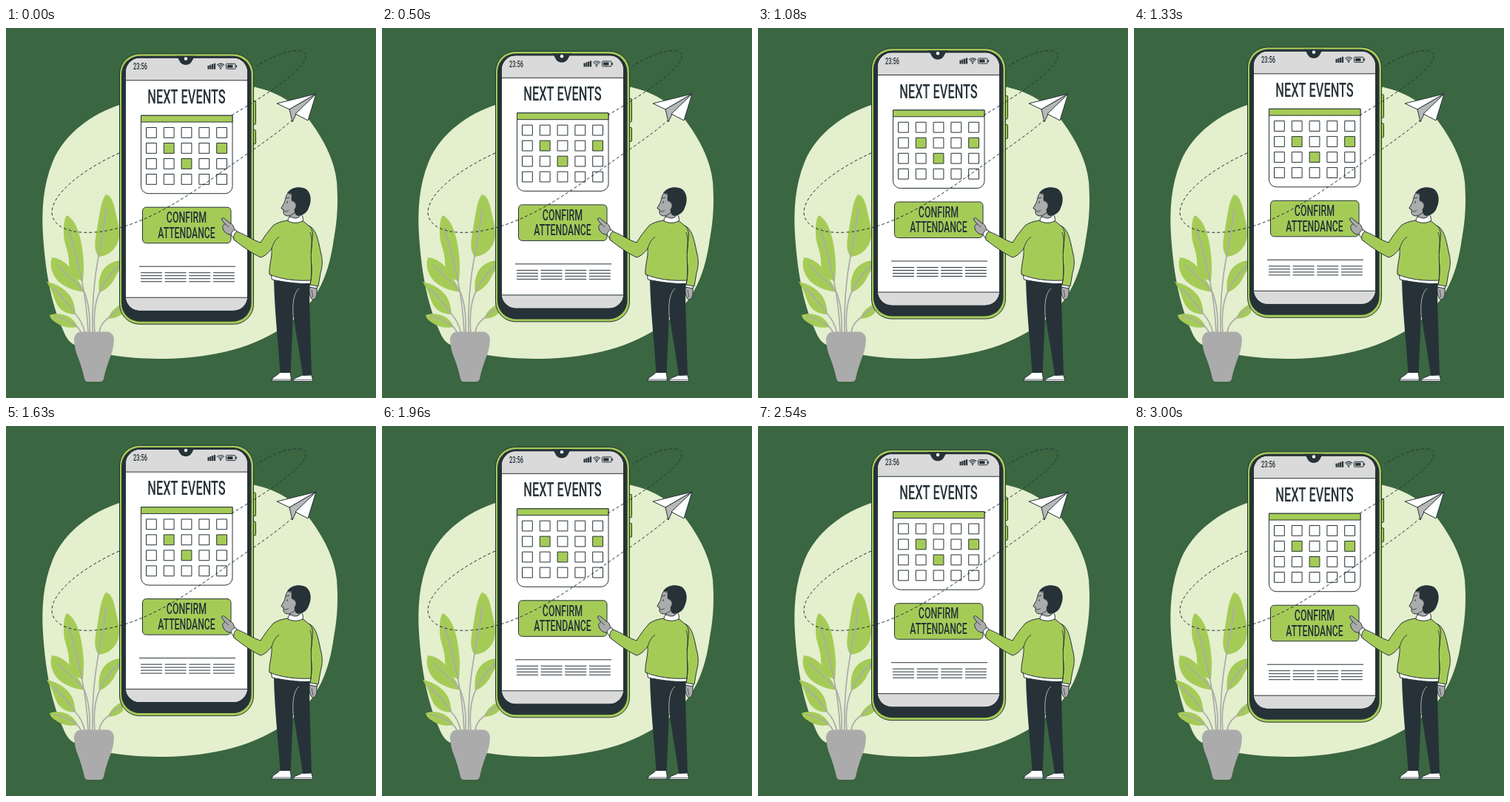
Recreate the animation shown at these times as an HTML page with a canvas. Size 500 by 500 pixels, loop 3.04 s.

```html
<!DOCTYPE html>
<html lang="en">
<head>
<meta charset="utf-8">
<title>Next events</title>
<style>
  html, body { margin: 0; width: 100%; height: 100%; overflow: hidden; background: #3a6641; }
  canvas { display: block; width: 500px; height: 500px; }
</style>
</head>
<body>
<canvas id="stage"></canvas>
<script>
const SIZE = 500;
const LOOP = 3040, FLOAT = 3000, FPS = 24, RISE = 10;
const DARK = '#263238', GREEN = '#a5cb57', GREY = '#ababab', BAR = '#dadada', WHITE = '#fff';
const NARROW = 0.62; // condensed lettering, shared by all text

const canvas = document.getElementById('stage');
const ctx = canvas.getContext('2d');
const dpr = window.devicePixelRatio || 1;
canvas.width = canvas.height = SIZE * dpr;

function shape(d, fill, stroke, width = 1) {
  const p = new Path2D(d);
  if (fill) { ctx.fillStyle = fill; ctx.fill(p); }
  if (stroke) { ctx.strokeStyle = stroke; ctx.lineWidth = width; ctx.stroke(p); }
}

function box(x, y, w, h, r, fill, stroke, width = 1) {
  ctx.beginPath();
  ctx.roundRect(x, y, w, h, r);
  if (fill) { ctx.fillStyle = fill; ctx.fill(); }
  if (stroke) { ctx.strokeStyle = stroke; ctx.lineWidth = width; ctx.stroke(); }
}

function dot(x, y, r, fill) {
  ctx.beginPath();
  ctx.arc(x, y, r, 0, Math.PI * 2);
  ctx.fillStyle = fill;
  ctx.fill();
}

function label(text, x, y, size) {
  ctx.save();
  ctx.translate(x, y);
  ctx.scale(NARROW, 1);
  ctx.font = `500 ${size}px Roboto, "Liberation Sans", sans-serif`;
  ctx.textAlign = 'center';
  ctx.fillStyle = DARK;
  ctx.fillText(text, 0, 0);
  ctx.restore();
}

function dashed(d) {
  ctx.save();
  ctx.setLineDash([4, 3]);
  shape(d, null, DARK);
  ctx.restore();
}

function backdrop() {
  ctx.fillStyle = '#3a6641';
  ctx.fillRect(0, 0, SIZE, SIZE);
  shape('M153 104C117 116 79 142 63 181C50 213 48 246 50 280C53 325 60 370 77 408C82 421 88 428 97 429' +
    'C130 443 170 447 214 447C280 446 338 432 382 399C424 369 437 328 443 285C448 258 449 236 447 208' +
    'C444 178 428 148 408 122C392 103 368 87 337 80C270 68 205 82 153 104Z', '#e4efce');
}

function plant() {
  const leaves = [
    'M135 225C143 226 146 238 149 253C154 272 155 287 147 297C141 305 134 308 126 309C119 304 119 290 123 272C126 256 128 233 135 225Z',
    'M82 253C92 258 98 272 101 287C105 306 106 324 104 342C93 340 85 329 85 316C85 300 77 291 78 274C78 265 79 257 82 253Z',
    'M62 310C74 311 84 319 90 329C96 340 102 346 106 357C94 355 83 352 74 345C63 337 58 322 62 310Z',
    'M55 343C66 345 78 351 85 360C92 368 93 378 94 387C83 387 73 382 68 372C64 362 61 352 55 343Z',
    'M59 388C67 385 79 386 86 391C92 395 95 399 97 404C87 406 76 404 69 399C64 396 60 393 59 388Z',
    'M158 314C145 314 134 320 129 331C125 340 125 349 126 358C136 353 143 346 147 338C150 331 154 326 158 322Z',
    'M158 372C148 377 140 384 138 393C147 393 154 389 158 385Z'
  ];
  for (const d of leaves) shape(d, GREEN);
  const stems = [
    'M117 413C116 375 119 340 125 308C129 285 134 265 135 245',
    'M111 413C110 385 107 362 102 339C97 315 90 290 85 270',
    'M113 413C114 390 112 372 106 357C97 344 81 333 70 321',
    'M107 413C104 400 100 393 94 387C85 374 75 362 64 352',
    'M102 413C100 407 96 403 91 400C83 395 74 391 66 390',
    'M120 413C118 389 120 370 127 356C133 341 143 329 156 319',
    'M126 413C126 404 130 398 138 392C145 385 151 381 156 378'
  ];
  ctx.lineCap = 'round';
  for (const d of stems) shape(d, null, GREY, 1.7);
  shape('M100 410.500H138Q145 412 146 420Q146 428 143 439Q135 459 132 474Q131 478 127 478H111' +
    'Q107 478 106 474Q103 459 95 439Q92 428 92 420Q93 412 100 410.500Z', GREY);
  ctx.lineCap = 'butt';
}

function statusBar() {
  label('23:56', 181.5, 56.2, 12);
  for (let i = 0; i < 4; i++) {
    const h = 5 + i;
    box(272.5 + i * 2.8, 56 - h, 2.2, h, 0, DARK);
  }
  ctx.strokeStyle = DARK;
  ctx.lineWidth = 1.1;
  for (const r of [2.4, 4.6, 6.8]) {
    ctx.beginPath();
    ctx.arc(290, 55.2, r, -Math.PI * 0.76, -Math.PI * 0.24);
    ctx.stroke();
  }
  dot(290, 55, 1, DARK);
  box(297.5, 48.5, 12.5, 7, 1, null, DARK);
  box(299, 50, 7.5, 4, 0, DARK);
  box(310.5, 50.5, 1.5, 3, 0, DARK);
}

function calendar() {
  box(182.5, 118.5, 123.5, 105.5, [0, 0, 10, 10], WHITE, DARK);
  box(182.5, 118.5, 123.5, 8.8, 0, GREEN, DARK);
  const booked = ['1,1', '4,1', '2,2'];
  for (let row = 0; row < 4; row++) {
    for (let col = 0; col < 5; col++) {
      const on = booked.includes(`${col},${row}`);
      box(189.5 + col * 23.8, 134.8 + row * 21, 13.8, 13.8, 0, on ? GREEN : WHITE, DARK);
    }
  }
}

function smallPrint() {
  shape('M180 322.500H310', null, DARK);
  for (let col = 0; col < 4; col++) {
    const x = 182 + col * 32.6;
    for (let row = 0; row < 4; row++) {
      const y = 331 + row * 4;
      shape(`M${x} ${y}h29`, null, DARK);
    }
  }
}

function phone() {
  box(332, 99, 5.5, 31.5, 1.5, GREEN, DARK);
  box(332, 138, 5.5, 19, 1.5, GREEN, DARK);
  box(153.5, 35.1, 181, 365.4, 27, GREEN, DARK);
  box(156, 38, 175.5, 359, 25, DARK);

  ctx.save();
  ctx.beginPath();
  ctx.roundRect(162, 41, 164, 341, 19);
  ctx.clip();
  ctx.fillStyle = WHITE;
  ctx.fillRect(162, 41, 164, 341);
  ctx.fillStyle = BAR;
  ctx.fillRect(162, 41, 164, 30);
  ctx.fillRect(162, 364.5, 164, 18);
  shape('M162 71H326M162 364.500H326', null, DARK);
  ctx.restore();

  shape('M229 38C235 40 233 50 243 50C253 50 251 40 257 38Z', DARK);
  dot(243, 41.8, 2.2, WHITE);
  statusBar();
  label('NEXT EVENTS', 244, 102, 26.4);
  calendar();
  box(184.5, 242.5, 119.5, 48.5, 5, GREEN, DARK);
  label('CONFIRM', 244, 263.2, 20);
  label('ATTENDANCE', 244, 283.8, 19.7);
  smallPrint();
}

function person() {
  // shoes
  shape('M359 477C359 471 368 470 371 464H384C384 468 386 473 385 477Z', WHITE, DARK);
  shape('M388 477.500C388 472 397 472 402 468H413C413 472 415 475 414.500 477.500Z', WHITE, DARK);
  shape('M359 475H385M388 475.500H414', null, DARK, 0.7);
  // trousers
  shape('M362 341L410 345C410 385 412 430 413 469.500L401 470C398 445 392 415 388 386' +
    'C387 412 386 440 384.500 466H370.500C368 425 363 385 362 341Z', DARK);
  shape('M396 352C389 357 387 372 388 388', null, '#e4efce', 0.7);

  // hanging hand and cuff
  shape('M411 348C409 355 410 361 413 366C417 369 420 364 420 358L420 349Z', GREY, DARK);
  shape('M413 354L415 364', null, DARK, 0.7);
  shape('M410.500 345L421 347L420 352L410 350Z', WHITE, DARK);
  shape('M409 267C419 271 422 287 425 302C428 313 428 321 425 331L422 349L411 347' +
    'C413 337 414 325 412 314Z', GREEN, DARK);

  // shirt hem
  shape('M358 332L412 339L411 345.500C393 346 374 343 359.500 340Z', WHITE, DARK);

  // pointing hand and cuff
  shape('M307 279C300 280 295 277 293 271C292 267 294 265 296 265L291.500 259' +
    'C291 256 294 256 296 258L303 264C307 265 308 269 309 274Z', GREY, DARK);
  shape('M296 265L301 269', null, DARK, 0.8);
  shape('M304 279C305 275 308 272 311 273L316 284L310 288Z', WHITE, DARK);

  // sweater
  shape('M381 260C373 261 366 263 361 267C354 275 349 282 344 290C334 287 323 279 312 275' +
    'C309 277 307 281 308 286C318 294 333 305 344 310C351 308 355 303 359 298' +
    'C360 311 355 321 356 333C373 340 393 342 412 341C414 324 411 312 413 296' +
    'C414 282 417 273 409 267C405 264 403 262 400 260Z', GREEN, DARK);
  shape('M359 298C361 291 364 286 369 282M412 303C414 292 413 281 411 276', null, DARK, 0.9);

  // neck and collar
  shape('M383 248L383 261H400L398 246Z', GREY, DARK);
  shape('M381 261C381 256 384 254 387 256C391 258 396 257 399 252C401 254 402 258 401 261' +
    'C395 264 387 264 381 261Z', WHITE, DARK);

  // head
  shape('M381 223C377 228 378 233 375 238L372 243C372 245 374 245 375 245L375 250' +
    'C376 255 384 255 388 251L394 246L396 230Z', GREY, DARK);
  shape('M380 223C385 215 398 213 406 218C413 224 413 235 409 243C407 250 401 253 395 254' +
    'C391 253 389 249 390 243C391 238 389 233 386 234C385 230 386 227 386 224Z', DARK);
  shape('M386 237C390 233 393 238 391 243C389 246 387 244 387 241Z', GREY);
  shape('M378 230L383 229M380 234V237M376 247C378 249 380 248 382 246', null, DARK, 0.9);
}

function plane() {
  ctx.lineJoin = 'round';
  shape('M419 89L366 102L383 110Z', WHITE, DARK);
  shape('M419 89L383 110L387 127L392 116Z', '#b8b8b8', DARK);
  shape('M419 89L391 116L408 125Z', WHITE, DARK);
  ctx.lineJoin = 'miter';
}

// Triangle wave: up for half the float, then back down.
function lift(t) {
  const step = Math.floor(t * FPS / 1000 + 0.09) + 1;
  const u = (step / FPS * 1000 % FLOAT) / FLOAT;
  return -RISE * (1 - Math.abs(1 - 2 * u));
}

function draw(t) {
  ctx.setTransform(dpr, 0, 0, dpr, 0, 0);
  backdrop();
  plant();
  ctx.save();
  ctx.translate(0, lift(t));
  phone();
  ctx.restore();
  dashed('M305 118C345 94 392 65 404 43C412 24 376 27 338 52');
  dashed('M153 169C106 190 61 224 62 250C64 276 107 283 153 270' +
    'C220 252 281 200 335 164C356 149 373 137 387 124');
  person();
  plane();
}

const start = performance.now();
function tick() {
  draw((performance.now() - start) % LOOP);
  requestAnimationFrame(tick);
}
tick();
</script>
</body>
</html>
```
